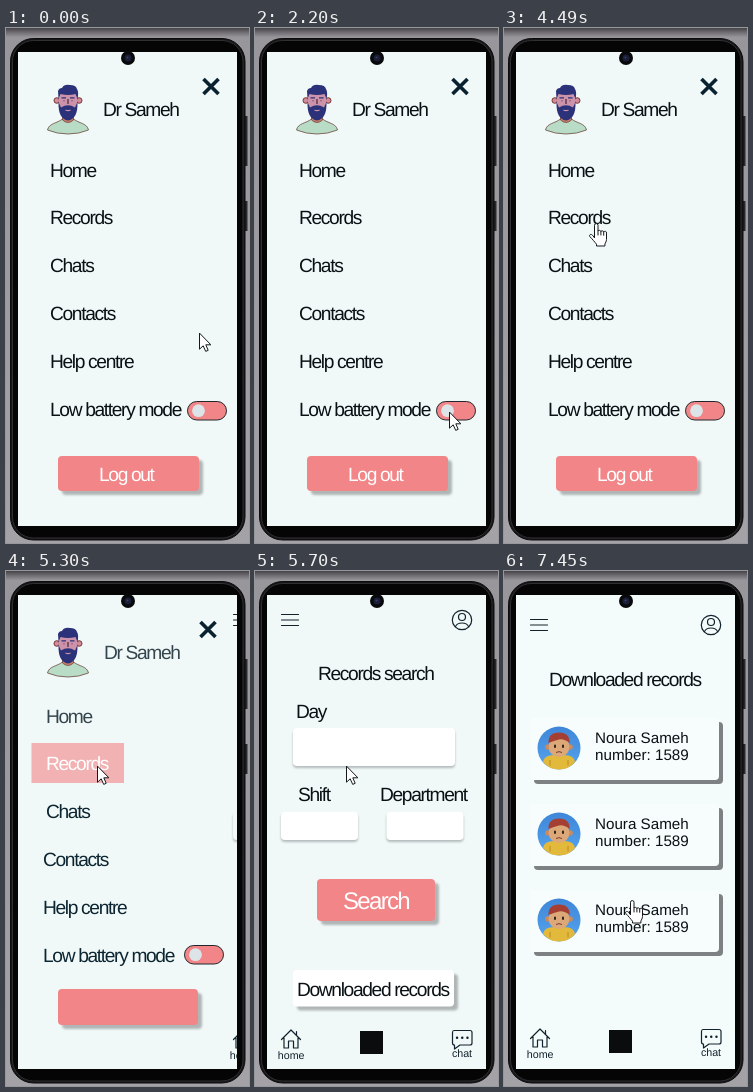
Recreate the animation shown at these times as an HTML page. Size 243 px wide and 515 px high, loop 8000 ms.

```html
<!DOCTYPE html>
<html lang="en">
<head>
<meta charset="utf-8">
<title>Clinic app menu</title>
<style>
html, body { margin: 0; width: 100%; height: 100%; overflow: hidden; background: #a19ea3; }
svg { display: block; }
#stage { position: absolute; left: 0; top: 0; }
text { font: 19.2px "Liberation Sans", Arial, sans-serif; letter-spacing: -.07em; fill: #0a1115; text-rendering: geometricPrecision; }
.row { font-size: 15.2px; letter-spacing: 0; }
.tab { font-size: 10.7px; letter-spacing: 0; text-anchor: middle; fill: #12222c; }
.big { font-size: 24px; }
.light { fill: #fff; }
.soft { fill: #35454d; }
.navy { fill: #0c2530; }
.line { fill: none; stroke: #12222c; stroke-width: 1.2; stroke-linecap: round; stroke-linejoin: round; }
.field { filter: drop-shadow(0 2px 1px #b4babb); }
.raised { filter: drop-shadow(4px 4px .8px #b0b5b6); }
.card { fill: #f6fdfc; filter: drop-shadow(4px 4px .6px #7d8183); }
.pink { fill: #f28587; }
.cursor { fill: #fff; stroke: #15181b; stroke-linejoin: round; stroke-linecap: round; }

/* everything holds between steps of one 8 s loop */
.menu, .picked, .search, .list, .cta, .slide, .paper, .knob, .pointer, .arrow, .hand {
  animation: 8s step-end infinite;
}
.menu { animation-name: menu; }
.picked { animation-name: picked; }
.search { animation-name: search; }
.list { animation-name: list; }
.cta { animation-name: cta; }
.slide { animation-name: slide; }
.paper { animation-name: paper; }
.knob { animation-name: knob; }
.pointer { animation-name: pointer; }
.arrow { animation-name: arrow; }
.hand { animation-name: hand; }

@keyframes menu { 0% { visibility: visible } 66.25%, 100% { visibility: hidden } }
@keyframes picked { 0%, 71.25%, 100% { visibility: hidden } 66.25% { visibility: visible } }
@keyframes search { 0%, 86.625%, 100% { visibility: hidden } 66.25% { visibility: visible } }
@keyframes list { 0% { visibility: hidden } 86.625%, 100% { visibility: visible } }
@keyframes paper { 0% { fill: #f0f9f8 } 71.25%, 100% { fill: #fff } }
@keyframes knob { 0%, 51.25%, 100% { transform: none } 29.25% { transform: translateX(17px) } }
@keyframes slide {
  0%, 66.25% { transform: translateX(201px) }
  67.75% { transform: translateX(114px) }
  69.5% { transform: translateX(20px) }
  71.25%, 100% { transform: none }
}
@keyframes cta {
  0% { x: 52px; y: 428px; width: 141px; height: 35px; visibility: visible }
  66.25% { x: 52px; y: 418px; width: 140px; height: 36px }
  67.75% { x: 55.5px; y: 369px; width: 131px; height: 39px }
  69.5% { x: 61px; y: 319px; width: 121px; height: 42px }
  71.25% { x: 62px; y: 308px; width: 118px; height: 42px; visibility: visible }
  86.625%, 100% { x: 62px; y: 308px; width: 118px; height: 42px; visibility: hidden }
}
@keyframes arrow {
  0%, 51.25%, 66.25% { visibility: visible }
  29.25%, 56.125%, 81.375%, 100% { visibility: hidden }
}
@keyframes hand {
  0%, 51.25%, 66.25% { visibility: hidden }
  29.25%, 56.125%, 81.375%, 100% { visibility: visible }
}
@keyframes pointer {
  0% { transform: translate(193px, 305px) }
  4.875% { transform: translate(194px, 329px) }
  6.5% { transform: translate(195px, 351px) }
  8.375% { transform: translate(196px, 360px) }
  10% { transform: translate(197px, 370px) }
  11.5% { transform: translate(196px, 378px) }
  12.875% { transform: translate(195px, 382px) }
  14.75% { transform: translate(194px, 384px) }
  29.25% { transform: translate(188px, 384px) }
  32.75% { transform: translate(194px, 384px) }
  34.375% { transform: translate(203px, 384px) }
  36% { transform: translate(211px, 384px) }
  37.5% { transform: translate(209px, 384px) }
  39.25% { transform: translate(206px, 384px) }
  41% { transform: translate(205px, 384px) }
  51.25% { transform: translate(178px, 330px) }
  52.75% { transform: translate(118px, 242px) }
  54.25% { transform: translate(94px, 209px) }
  56.125% { transform: translate(85px, 195px) }
  66.25% { transform: translate(91px, 195px) }
  76.5% { transform: translate(98px, 260px) }
  78% { transform: translate(110px, 382px) }
  79.5% { transform: translate(117px, 443px) }
  81.375% { transform: translate(121px, 422px) }
  83.25% { transform: translate(121px, 418px) }
  86.625% { transform: translate(121px, 413px) }
  89.75% { transform: translate(121px, 380px) }
  91.25% { transform: translate(121px, 349px) }
  93.125%, 100% { transform: translate(121px, 329px) }
}
</style>
</head>
<body>
<svg id="stage" width="243" height="515" viewBox="0 0 243 515">
  <defs>
    <linearGradient id="wall" x2="0" y2="1">
      <stop stop-color="#454347"/><stop offset=".008" stop-color="#6c6a6e"/>
      <stop offset=".018" stop-color="#99969b"/><stop offset="1" stop-color="#a5a2a7"/>
    </linearGradient>
    <linearGradient id="sky" x2="0" y2="1">
      <stop stop-color="#3f86d8"/><stop offset="1" stop-color="#55a4ee"/>
    </linearGradient>
    <clipPath id="screen"><path d="M12 24H231V498H12Z"/></clipPath>

    <g id="doctor">
      <path d="M41.500 102C43 95 51 95.500 56.500 91H67.500C73 95.500 81 95 82.500 102Q73 106 62 106T41.500 102Z" fill="#b9dcc6" stroke="#6b4a40" stroke-width=".8"/>
      <path d="M56.500 84H67.500V92Q62 97 56.500 92Z" fill="#c9806a" stroke="#6b3a34" stroke-width=".7"/>
      <g fill="#d08c9c" stroke="#7a3432" stroke-width="1">
        <circle cx="50.800" cy="72.500" r="2.800"/><circle cx="73.200" cy="72.500" r="2.800"/>
      </g>
      <path d="M53 64H71V80Q69 88 62 88T53 80Z" fill="#cd93ab"/>
      <path d="M52.500 71L52 63Q53 60 56 60Q58 56 64 57Q70 57 71 61Q73 64 71.500 71L69.500 66Q62 68 54.500 66Z" fill="#2b3279"/>
      <path d="M52.500 74L55 79.500Q62 75 69 79.500L71.500 74Q72 91 62 92.500Q52 91 52.500 74Z" fill="#2b3279"/>
      <path d="M59.500 82Q62 83.200 64.500 82" stroke="#cd93ab" stroke-width="1.200" fill="none"/>
      <path d="M55.500 69.800H60M64 69.800H68.500" stroke="#2b3279" stroke-width="1.300"/>
      <path d="M58 72.500V73.200M66 72.500V73.200M62 71V76" stroke="#4a2438" stroke-width="1.200"/>
    </g>

    <g id="close"><path d="M197.500 51L212.500 66M212.500 51L197.500 66" stroke="#0a2230" stroke-width="3.600"/></g>
    <rect id="track" x="181.500" y="373.500" width="39" height="18.500" rx="9.250" class="pink" stroke="#20262b"/>
    <circle id="dot" cx="192.500" cy="382.700" r="6.400" fill="#dde4e8"/>

    <g id="top" class="line">
      <path d="M26.500 43.500H43.500M26.500 49H43.500M26.500 54.500H43.500"/>
      <circle cx="207" cy="49" r="9.700"/><circle cx="207" cy="46" r="3.500"/>
      <path d="M200.500 55.500Q202 52 207 52T213.500 55.500"/>
    </g>
    <g id="tabs">
      <path class="line" d="M26.500 468.500L36 459L45.500 468.500M29 467V477H33.500V470H38.500V477H43V467M41.500 460.500V464"/>
      <text class="tab" x="36.200" y="487.500">home</text>
      <rect x="105" y="460" width="23" height="23" fill="#0b0c0e"/>
      <path class="line" d="M199 459.500H215Q217 459.500 217 461.500V472Q217 474 215 474H205L199.500 478V474Q197.500 474 197.500 472V461.500Q197.500 459.500 199 459.500Z"/>
      <path d="M202 466.800h.1M207.200 466.800h.1M212.400 466.800h.1" stroke="#12222c" stroke-width="2.400" stroke-linecap="round"/>
      <text class="tab" x="207" y="486">chat</text>
    </g>

    <g id="entry">
      <rect class="card" x="26" y="147" width="189" height="62" rx="4"/>
      <circle cx="55" cy="177" r="21.500" fill="url(#sky)"/>
      <path d="M39 191Q40 184 50 184H60Q70 184 71 191Q65 198.500 55 198.500T39 191Z" fill="#e3b93c"/>
      <path d="M46 189V194.500M64 189V194.500" stroke="#b98c22"/>
      <circle cx="44" cy="176" r="2.800" fill="#c98a5c"/><circle cx="66" cy="176" r="2.800" fill="#c98a5c"/>
      <ellipse cx="55" cy="175.500" rx="10.500" ry="10.500" fill="#dda878"/>
      <path d="M44.500 172Q44 161.500 55 161.500T65.500 172Q60 167.500 55 168.500T44.500 172Z" fill="#a63f33"/>
      <path d="M51 174.500V176M59 174.500V176" stroke="#33231f" stroke-width="2" stroke-linecap="round"/>
      <path d="M52 181.500Q55 179.800 58 181.500" stroke="#7d3b30" fill="none"/>
      <text class="row" x="91" y="172">Noura Sameh</text>
      <text class="row" x="91" y="188.500">number: 1589</text>
    </g>
  </defs>

  <rect width="243" height="515" fill="url(#wall)"/>
  <path d="M240 88V138M240 173V203" stroke="#29292c" stroke-width="3"/>
  <rect x="4.500" y="10.500" width="234.500" height="501.500" rx="23" fill="#161618" stroke="#0b0b0c"/>
  <rect x="6.500" y="12.500" width="230.500" height="497.500" rx="21" fill="#050506" stroke="#303033"/>
  <rect x="12" y="24" width="219" height="474" fill="#f0f9f8"/>

  <g clip-path="url(#screen)">
    <g class="raised"><rect class="pink cta" x="52" y="428" width="141" height="35" rx="4"/></g>

    <g class="menu">
      <use href="#doctor"/>
      <use href="#close"/>
      <text x="97" y="88">Dr Sameh</text>
      <text x="44" y="148.500">Home</text>
      <text x="44" y="196">Records</text>
      <text x="44" y="244">Chats</text>
      <text x="44" y="292">Contacts</text>
      <text x="44" y="340">Help centre</text>
      <text x="44" y="387.500">Low battery mode</text>
      <use href="#track"/>
      <g class="knob"><use href="#dot"/></g>
      <text class="light" x="93" y="453">Log out</text>
    </g>

    <g class="picked">
      <use href="#doctor"/>
      <use href="#close" x="-3"/>
      <rect x="25.500" y="172" width="92.500" height="40" fill="#f2b1b2"/>
      <text class="soft" x="98" y="88">Dr Sameh</text>
      <text class="soft" x="40" y="151.500">Home</text>
      <text class="light" x="40" y="199">Records</text>
      <text class="navy" x="40" y="247">Chats</text>
      <text class="navy" x="37" y="295">Contacts</text>
      <text class="navy" x="37" y="343">Help centre</text>
      <text class="navy" x="37" y="391">Low battery mode</text>
      <g transform="translate(-3 1)"><use href="#track"/><use href="#dot"/></g>
    </g>

    <g class="search">
      <g class="slide">
        <use href="#top"/>
        <use href="#tabs"/>
        <text x="63" y="109">Records search</text>
        <text x="41" y="146.500">Day</text>
        <rect class="field paper" x="38" y="157" width="162" height="38" rx="4"/>
        <text x="43" y="230">Shift</text>
        <text x="125" y="230">Department</text>
        <rect class="field paper" x="26" y="241" width="77" height="28" rx="4"/>
        <rect class="field paper" x="131.500" y="241" width="77" height="28" rx="4"/>
        <text class="big paper" x="88" y="337.500">Search</text>
        <rect class="raised paper" x="38" y="399" width="161" height="36.500" rx="4"/>
        <text x="42" y="424.500">Downloaded records</text>
      </g>
    </g>

    <g class="list">
      <rect x="12" y="24" width="219" height="474" fill="#f4fcfb"/>
      <use href="#top" y="5"/>
      <use href="#tabs" y="-1"/>
      <text x="45" y="114.500">Downloaded records</text>
      <use href="#entry"/>
      <use href="#entry" y="86"/>
      <use href="#entry" y="172"/>
    </g>
  </g>

  <circle cx="122" cy="30" r="7" fill="#08090b"/>
  <circle cx="122" cy="30" r="3.500" fill="#191d38"/>
  <circle cx="121.500" cy="29.500" r="1" fill="#3a4160"/>

  <g class="pointer">
    <path class="cursor arrow" d="M.5 .5V16.200L4.200 12.800L6.700 18.400L9.200 17.300L6.800 11.800H11.500Z"/>
    <g class="cursor hand">
      <path d="M5.500 14.500V2.300a1.750 1.750 0 0 1 3.500 0V8a1.700 1.700 0 0 1 2.900 .4a1.600 1.600 0 0 1 2.800 .7a1.500 1.500 0 0 1 2.800 1V16.500C17.500 18.500 16.300 19.800 15.900 21V23H7.500V21.200C6 19.300 3.200 16 .8 13.500C-.2 12 1.700 10.500 3.300 12Z"/>
      <path d="M9 8V12M11.900 8.400V12M14.700 9.100V12.300" fill="none"/>
    </g>
  </g>
</svg>
</body>
</html>
```
